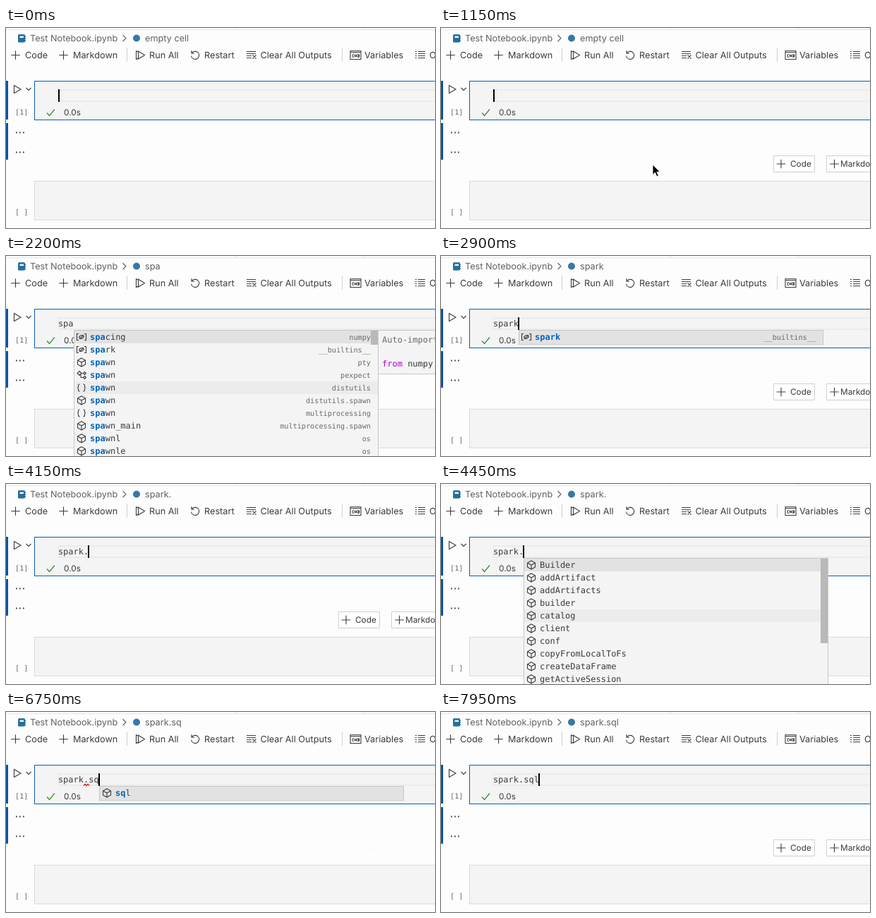
An HTML page that plays this animation: 608x284 px, repeating every 8000 ms.

```html
<!DOCTYPE html>
<html lang="en">
<head>
<meta charset="utf-8">
<title>Notebook autocomplete</title>
<style>
  html, body { margin: 0; width: 100%; height: 100%; overflow: hidden; background: #fdfdfd; }
  svg { display: block; width: 608px; height: 284px; text-rendering: geometricPrecision; }
  text { white-space: pre; fill: #3b3b3b; }
  .ui { font: 12.7px Inter, sans-serif; }
  .small { font: 11.8px Inter, sans-serif; }
  .mono { font: 12px "DejaVu Sans Mono", monospace; }
  .note { font: 10.2px "DejaVu Sans Mono", monospace; fill: #6a6a6a; }
  .crumb { fill: #616161; }
  .hit { font-weight: bold; fill: #0064bd; }
  .line { fill: none; stroke: #3b3b3b; stroke-width: 1.1; }
  .box { fill: #f4f4f4; stroke: #dadada; }
  .popup { fill: #f4f4f4; stroke: #c8c8c8; }
</style>
</head>
<body>
<svg viewBox="0 0 608 284">
  <defs>
    <path id="plus" class="line" d="M-6.3 0H6.3M0-6.3V6.3"/>
    <path id="cube" class="line" d="M0-6L5.5-3V3L0 6L-5.5 3V-3ZM-5.5-3L0 0L5.5-3M0 0V6"/>
    <g id="value" class="line">
      <path d="M-4-4.5H-6.5V4.5H-4M4-4.5H6.5V4.5H4M-2.5 2.5L3-2.5"/>
      <ellipse rx="3.3" ry="2.3" transform="rotate(-25)"/>
    </g>
    <g id="type" class="line">
      <path d="M-3-5.5L0-2.5L-3 .5L-6-2.5ZM0-2.5H3M-1-1.5V3.5H3"/>
      <path d="M4.5-4.5L6.5-2.5L4.5-.5L2.5-2.5ZM4.5 1.5L6.5 3.5L4.5 5.5L2.5 3.5Z"/>
    </g>
    <path id="module" class="line" d="M-2.5-5Q-4.5-5-4.5-3V-1.5Q-4.5 0-6 0Q-4.5 0-4.5 1.5V3Q-4.5 5-2.5 5M2.5-5Q4.5-5 4.5-3V-1.5Q4.5 0 6 0Q4.5 0 4.5 1.5V3Q4.5 5 2.5 5"/>
  </defs>

  <rect width="608" height="284" fill="#fdfdfd"/>
  <path d="M506 0H608V2H506Z" fill="#f8f8f8"/>
  <path d="M0 2.5H608M325.5 0V2M505.5 0V2" stroke="#e4e4e4"/>

  <!-- breadcrumb -->
  <rect x="17" y="9" width="10" height="11.5" rx="1.5" fill="#266f9b"/>
  <path d="M19.5 11.5H25V14H19.5Z" fill="#e8f1f6"/>
  <path d="M27 11V13M27 14V16M27 17V19" stroke="#266f9b" stroke-width="1.6"/>
  <text class="ui crumb" x="34" y="19">Test Notebook.ipynb</text>
  <path class="line" d="M165.5 10L170 14.5L165.5 19" style="stroke:#616161"/>
  <circle cx="185" cy="14.5" r="5" fill="#3877a8"/>
  <text id="crumb" class="ui crumb" x="197" y="19"></text>

  <!-- toolbar -->
  <use href="#plus" x="13.5" y="38.5"/><text class="ui" x="27" y="43">Code</text>
  <use href="#plus" x="81.5" y="38.5"/><text class="ui" x="95" y="43">Markdown</text>
  <path d="M171.5 28V48M476.5 28V48" stroke="#d0d0d0"/>
  <path class="line" d="M184.5 32V45M187.5 33L196.5 38.5L187.5 44ZM184.5 32.5L188 34.5M184.5 44.5L188 42.5"/>
  <text class="ui" x="203" y="43">Run All</text>
  <path class="line" d="M263.5 35.5A5.6 5.6 0 1 1 262.5 39.5M263 32V36H267"/>
  <text class="ui" x="281" y="43">Restart</text>
  <path class="line" d="M341 33.5H354M341 36.5H354M341 39.5H348M341 42.5H348M349.5 38.5L354.5 43.5M354.5 38.5L349.5 43.5"/>
  <text class="ui" x="360.5" y="43">Clear All Outputs</text>
  <path class="line" d="M488 32.5H503V44.5H488ZM488 34.5H503M492.5 37Q489.5 39.5 492.5 42M499.5 37Q502 39.5 499.5 42M493.5 38L496 41M496 38L493.5 41"/>
  <circle class="line" cx="498" cy="39.5" r="1.5"/>
  <text class="ui" x="508" y="43">Variables</text>
  <path class="line" d="M580 33.5H582M580 36.5H582M580 39.5H582M580 42.5H582M584 33.5H594M584 36.5H594M584 39.5H594M584 42.5H594"/>
  <text class="ui" x="600" y="43">Outline</text>

  <!-- cells -->
  <path d="M0 75H3V130H0ZM0 135H3V187H0Z" fill="#0b52a8"/>
  <path class="line" d="M11.5 81.5L21 87L11.5 92.5ZM28.5 85L32 88.5L35.5 85"/>
  <text class="note" x="13" y="123">[1]</text>
  <path d="M14 148.5H26M14 176.5H26" stroke="#444" stroke-width="1.8" stroke-dasharray="1.8 3.2"/>
  <rect class="box" x="40.5" y="75.5" width="580" height="55" style="stroke:#0a5cb5"/>
  <path d="M608 88H74.5V104H608" fill="none" stroke="#e9e9e9" stroke-width="1.4"/>
  <text id="code" class="mono" x="73.9" y="100"></text>
  <path d="M58 120.5L61.5 124.5L69 115.5" fill="none" stroke="#388a34" stroke-width="1.2"/>
  <text class="small" x="82" y="123.5">0.0s</text>
  <rect class="box" x="40.5" y="217.5" width="580" height="55"/>
  <text class="note" x="13" y="265">[ ]</text>

  <g id="buttons">
    <path d="M471.5 181.5H529.5V204.5H471.5ZM546.5 181.5H620V204.5H546.5Z" fill="#fff" stroke="#cfcfcf"/>
    <use href="#plus" x="482" y="193"/><text class="small" x="495" y="197">Code</text>
    <use href="#plus" x="557.5" y="193"/><text class="small" x="566" y="197">Markdown</text>
  </g>

  <path id="squiggle" d="M110 104.5L112 102.5L114 104.5L116 102.5L118 104.5" fill="none" stroke="#e51400" stroke-width="1.3"/>
  <g id="bulb" fill="#333">
    <circle cx="125.5" cy="92.5" r="4.8"/>
    <path d="M123 95H128V101H123Z"/>
    <path d="M123 98.5H128" stroke="#f4f4f4" stroke-width=".8"/>
  </g>
  <g id="popup"></g>
  <rect id="caret" y="87" width="2" height="18" fill="#000"/>
  <path id="pointer" d="M300 194V208.5L303.4 205.3L305.9 211L308.4 210L305.9 204.4H310.4Z" fill="#000" stroke="#fff" stroke-width=".9"/>
</svg>
<script>
const LOOP = 8000, LEFT = 73.9, CHAR = 7.22, ROW = 18, TOP = 106;
const $ = id => document.getElementById(id);

const typed = [[0, ""], [1300, "s"], [1550, "sp"], [1650, "spa"], [2250, "spar"],
  [2450, "spark"], [4120, "spark."], [6580, "spark.s"], [6680, "spark.sq"], [7470, "spark.sql"]];

// Moments that restart the caret blink: every edit plus the accepted suggestion.
const blinks = [[-100], ...typed.slice(1), [3400]].sort((a, b) => a[0] - b[0]);

const fades = [[100, 0], [400, 1], [1750, 1], [1950, 0], [2600, 0], [2900, 1],
  [4250, 1], [4450, 0], [6750, 0], [7050, 1]];

const cubes = names => names.split(" ").map(name => [name, "cube"]);
const spark = ["spark", "value", "__builtins__"];

const lists = {
  spa: { hit: 3, at: 3, thumb: 20, pane: true, rows: [
    ["spacing", "value", "numpy"], spark,
    ["spawn", "cube", "pty"], ["spawn", "type", "pexpect"],
    ["spawn", "module", "distutils"], ["spawn", "cube", "distutils.spawn"],
    ["spawn", "module", "multiprocessing"], ["spawn_main", "cube", "multiprocessing.spawn"],
    ["spawnl", "cube", "os"], ["spawnle", "cube", "os"]] },
  spar: { hit: 4, at: 4, rows: [spark] },
  spark: { hit: 5, at: 5, rows: [spark] },
  members: { hit: 0, at: 6, thumb: 120, rows: cubes("Builder addArtifact addArtifacts " +
    "builder catalog client conf copyFromLocalToFs createDataFrame getActiveSession") },
  s: { hit: 1, at: 7, rows: cubes("sparkContext sql stop streams") },
  sq: { hit: 2, at: 8, rows: cubes("sql") }
};
const popups = [[0, ""], [1750, "spa"], [2250, "spar"], [2450, "spark"], [3400, ""],
  [4250, "members"], [6580, "s"], [6680, "sq"], [7470, ""]];

const latest = (steps, t) => steps.filter(s => s[0] <= t).pop();

function ramp(points, t) {
  const i = points.findIndex(p => p[0] > t);
  if (i === 0) return points[0][1];
  if (i < 0) return points[points.length - 1][1];
  const [t0, a] = points[i - 1], [t1, b] = points[i];
  return a + (b - a) * (t - t0) / (t1 - t0);
}

const rect = (x, y, w, h, fill) =>
  `<rect x="${x}" y="${y}" width="${w}" height="${h}" fill="${fill}"/>`;

function popupMarkup({ hit, at, rows, thumb, pane }) {
  const x = Math.round(LEFT + at * CHAR), height = rows.length * ROW + 2;
  let out = `<rect class="popup" x="${x + .5}" y="105.5" width="431" height="${height}"/>`;
  rows.forEach(([name, icon, note = ""], i) => {
    const y = TOP + i * ROW;
    if (i === 0) out += rect(x + 1, y, 430, rows.length > 1 ? ROW : ROW + 1, "#e2e2e2");
    if (i === 4) out += rect(x + 1, y, 430, ROW, "#ececec");
    out += `<use href="#${icon}" x="${x + 11}" y="${y + 9}"/>
      <text class="mono" x="${x + 23}" y="${y + 13}"><tspan class="hit">${name.slice(0, hit)}</tspan>${name.slice(hit)}</text>
      <text class="note" x="${x + 421}" y="${y + 12.5}" text-anchor="end">${note}</text>`;
  });
  if (thumb) out += rect(x + 421, TOP, 10, thumb, "#b9b9b9");
  if (pane) out += `<rect class="popup" x="${x + 431.5}" y="105.5" width="100" height="62"/>
    <text class="mono" x="533" y="123" style="fill:#6a6a6a">Auto-import</text>
    <text class="mono" x="533" y="157"><tspan fill="#af00db">from</tspan> numpy</text>`;
  return out;
}

let shown = "";
const show = (id, on) => $(id).setAttribute("visibility", on ? "visible" : "hidden");

function draw(t) {
  const text = latest(typed, t)[1], list = latest(popups, t)[1];
  $("code").textContent = text;
  $("crumb").textContent = text || "empty cell";
  $("caret").setAttribute("x", Math.max(74, Math.floor(LEFT - .6 + text.length * CHAR)));
  show("caret", (t - latest(blinks, t)[0]) % 1000 < 500);
  show("pointer", t >= 100 && t < 1300);
  show("squiggle", t >= 4900 && t < 7470);
  show("bulb", t >= 5120 && t < 6580);
  $("buttons").setAttribute("opacity", ramp(fades, t));
  if (list !== shown) {
    $("popup").innerHTML = list ? popupMarkup(lists[list]) : "";
    shown = list;
  }
}

const start = performance.now();
function tick() {
  draw((performance.now() - start) % LOOP);
  requestAnimationFrame(tick);
}
tick();
</script>
</body>
</html>
```
